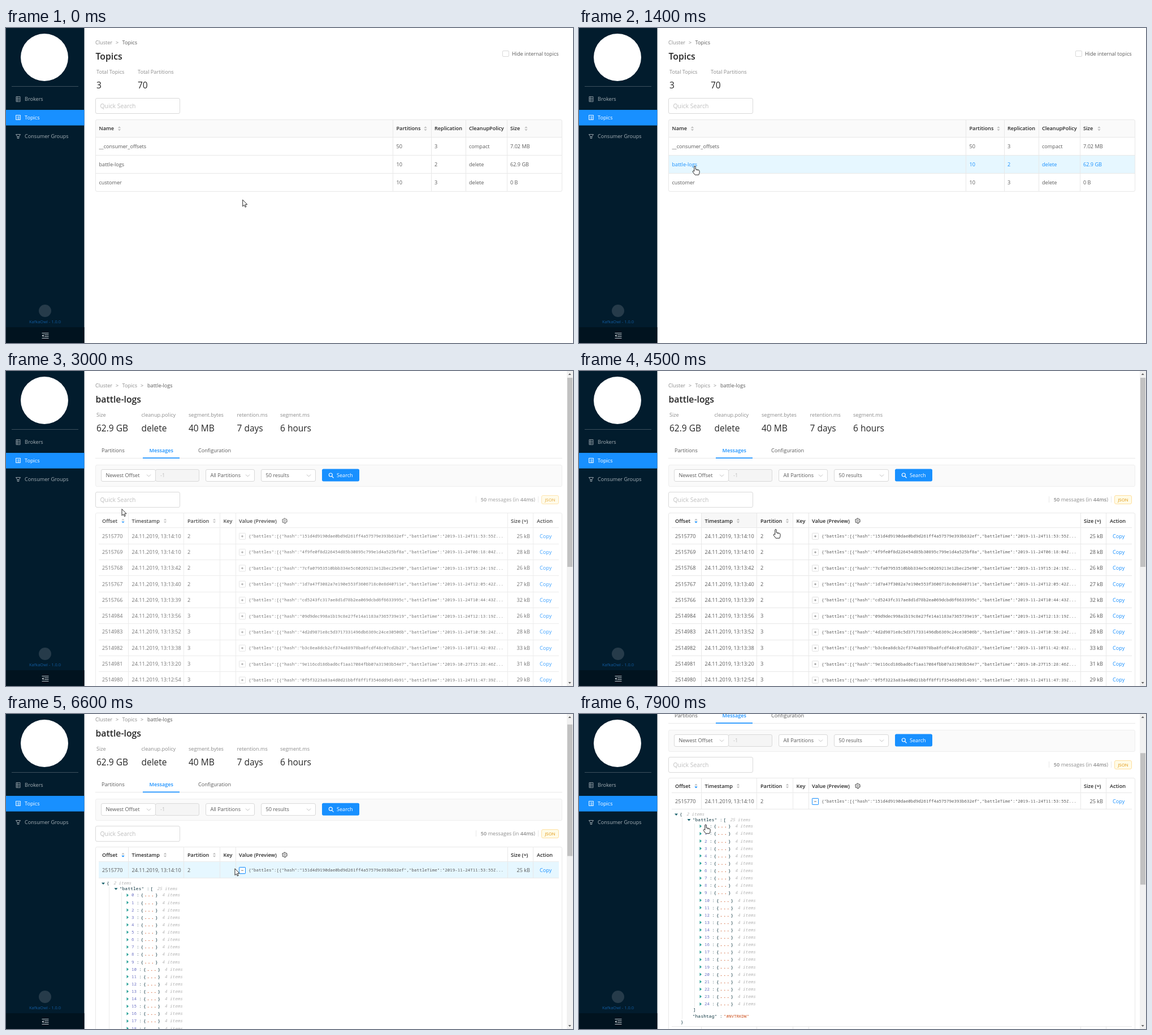
Recreate the animation shown at these times as an HTML page. Size 1003 px wide and 558 px high, loop 8000 ms.

```html
<!DOCTYPE html>
<html lang="en">
<head>
<meta charset="utf-8">
<title>Topic browser</title>
<style>
  html, body { margin: 0; width: 100%; height: 100%; overflow: hidden; background: #fff; }
  svg { display: block; width: 1003px; height: 558px; }
  text { font: 9.12px "Open Sans", sans-serif; fill: #595959; white-space: pre; }
  .dim { fill: #8c8c8c; }
  .bold { font-weight: 600; fill: #262626; }
  .title { font-size: 15.8px; font-weight: 600; fill: #262626; }
  .stat { font-size: 15.5px; fill: #262626; }
  .hint { font-size: 10.4px; fill: #bfbfbf; }
  .pale { fill: #bfbfbf; }
  .blue { fill: #1890ff; }
  .active { fill: #1890ff; font-weight: 600; }
  .white { fill: #fff; }
  .menu { fill: #a6b0b6; }
  .version { font-size: 7.5px; fill: #125a9e; text-anchor: middle; }
  .tag { font-size: 7.9px; fill: #e0940c; }
  .end { text-anchor: end; }
  .mid { text-anchor: middle; }
  .big { font-size: 11.6px; text-anchor: middle; }
  .mono, .key, .dots, .count, .index, .string { font: 7.53px "Noto Sans Mono", monospace; }
  .key { fill: #002b36; letter-spacing: .3px; }
  .dots { fill: #cb4b16; font-weight: 700; letter-spacing: 1.6px; }
  .count { fill: #b3b3b3; font-style: italic; }
  .index { fill: #6c71c4; }
  .string { fill: #cb4b16; }
</style>
</head>
<body>
<svg id="stage" viewBox="0 0 1003 558"></svg>
<script>
const LOOP = 8000, BLUE = '#1890ff', BORDER = '#e8e8e8', HOVER = '#e6f7ff';

// --- markup helpers ---
const text = (x, y, s, cls = '') => `<text x="${x}" y="${y}" class="${cls}">${s}</text>`;
const rect = (x, y, w, h, fill, extra = '') =>
  `<rect x="${x}" y="${y}" width="${w}" height="${h}" fill="${fill}" ${extra}/>`;
const box = (x, y, w, h, fill = '#fff', stroke = '#d9d9d9', r = 2.5) =>
  rect(x + .5, y + .5, w - 1, h - 1, fill, `stroke="${stroke}" rx="${r}"`);
const path = (d, fill, extra = '') => `<path d="${d}" fill="${fill}" ${extra}/>`;
const stroke = (d, color, width = 1) => path(d, 'none', `stroke="${color}" stroke-width="${width}"`);
const hLine = (x, y, w, color = BORDER) => rect(x, y, w, 1, color);
const vLine = (x, y, h, color = BORDER) => rect(x, y, 1, h, color);
const group = (id, body, extra = '') => `<g id="${id}" ${extra}>${body}</g>`;
const each = (list, fn) => list.map(fn).join('');
const range = n => [...Array(n).keys()];

const sorter = (x, y, down = '#bfbfbf') =>
  path(`M${x - 2.7} ${y - 1}h5.4l-2.7 -3z`, '#bfbfbf') + path(`M${x - 2.7} ${y + 1}h5.4l-2.7 3z`, down);
const gear = (x, y) => `<circle cx="${x}" cy="${y}" r="4.3" fill="none" stroke="#595959" stroke-width="1.2" stroke-dasharray="3.2 1.3"/>`
  + `<circle cx="${x}" cy="${y}" r="3.6" fill="#fff" stroke="#595959" stroke-width=".8"/>`
  + `<circle cx="${x}" cy="${y}" r="1.4" fill="none" stroke="#595959" stroke-width=".8"/>`;
const select = (x, w, label) => box(x, 174, w, 22) + text(x + 8.5, 188.3, label)
  + stroke(`M${x + w - 16} 183.5l3.5 3.5l3.5 -3.5`, '#bfbfbf');
const quickSearch = y => box(158, y, 150, 28) + text(166.5, y + 18, 'Quick Search', 'hint');
const stats = list => each(list, ([x, label, value]) => text(x, 81.3, label, 'dim') + text(x, 107, value, 'stat'));

// --- sidebar ---
const sidebar = rect(0, 0, 138.5, 558, '#021c2d') + rect(0, 530, 138.5, 28, '#01131f')
  + '<circle cx="68" cy="52" r="42" fill="#fff"/><circle cx="69" cy="501" r="11" fill="#263b4a"/>'
  + hLine(10, 103, 118, '#3c505d') + rect(0, 145, 138.5, 27.6, BLUE)
  + stroke('M18 121.5h7v9h-7zM18 124.5h7M18 127.5h7M19.5 123h2M19.5 126h2M19.5 129h2', '#a6b0b6', .8)
  + stroke('M17.5 154.5h8v8h-8zM19 157h1M21 157h3M19 159h1M21 159h3M19 161h1M21 161h3', '#fff', .9)
  + stroke('M17.5 188.5h8l-2.7 4v3h-2.6v-3zM20 192.5h3', '#a6b0b6', .9)
  + text(33, 129.3, 'Brokers', 'menu') + text(33, 162.3, 'Topics', 'white')
  + text(33, 195.3, 'Consumer Groups', 'menu') + text(69, 523.3, 'KafkaOwl - 1.0.0', 'version')
  + stroke('M63.5 540.5h12M68 543.5h7.5M68 546.5h7.5M63.5 549.5h12', '#c4c9ce') + path('M66.5 542.5v5l-3 -2.5z', '#c4c9ce');

// --- topic list ---
const topics = [
  ['__consumer_offsets', 50, 3, 'compact', '7.02 MB'],
  ['battle-logs', 10, 2, 'delete', '62.9 GB'],
  ['customer', 10, 3, 'delete', '0 B'],
];
const topicX = [164.5, 690.5, 758, 819, 892];
const topicCells = (row, cls) => each(topics[row], (s, i) => text(topicX[i], 213.3 + row * 31.8, s, cls));
const topicHover = (id, row) => group(id, rect(159, 194 + row * 31.8, 824, 31.5, HOVER) + topicCells(row, 'blue'));
const topicPage = text(158, 29.3, 'Cluster', 'dim') + text(194, 29.3, '&gt;', 'dim') + text(205.5, 29.3, 'Topics')
  + text(158.5, 55.8, 'Topics', 'title') + box(878, 40, 12, 11, '#fff', '#d9d9d9', 1.5)
  + text(895, 49.3, 'Hide internal topics')
  + stats([[160, 'Total Topics', 3], [233, 'Total Partitions', 70]]) + quickSearch(124)
  + rect(158, 162, 826, 32, '#fafafa', 'rx="3"')
  + each(range(3), i => topicCells(i))
  + topicHover('hoverBattle', 1) + topicHover('hoverCustomer', 2)
  + box(158, 162, 826, 128, 'none', BORDER)
  + each([193, 225, 257], y => hLine(158, y, 826)) + each([684, 752, 813, 886], x => vLine(x, 162, 128))
  + each(['Name', 'Partitions', 'Replication', 'CleanupPolicy', 'Size'], (s, i) => text(topicX[i], 181.4, s, 'bold'))
  + each([200.5, 742, 920], x => sorter(x, 178.3));

// --- topic details ---
const details = text(158, 29.3, 'Cluster', 'dim') + text(194, 29.3, '&gt;', 'dim') + text(205.5, 29.3, 'Topics', 'dim')
  + text(238, 29.3, '&gt;', 'dim') + text(250, 29.3, 'battle-logs') + text(158.5, 55.8, 'battle-logs', 'title')
  + stats([[160, 'Size', '62.9 GB'], [239.5, 'cleanup.policy', 'delete'], [323, 'segment.bytes', '40 MB'],
           [408.5, 'retention.ms', '7 days'], [485, 'segment.ms', '6 hours']])
  + text(169, 143.8, 'Partitions') + text(253.5, 143.8, 'Messages', 'active') + text(340, 143.8, 'Configuration')
  + hLine(158, 154, 826) + rect(242, 153.3, 65, 1.7, BLUE)
  + box(158, 166, 826, 39, '#fafafa', '#eeeeee') + box(264, 174, 78, 22, '#f5f5f5') + select(168, 97, 'Newest Offset')
  + text(273, 188.3, '-1', 'pale') + select(353, 87, 'All Partitions') + select(451, 97, '50 results')
  + group('button', rect(559, 173.5, 66, 22, BLUE, 'rx="2.7"') + text(585, 188.3, 'Search', 'white'))
  + group('lens', stroke('M576.5 186.5l3 3M577.3 184a3 3 0 1 1 -6 0a3 3 0 1 1 6 0', '#fff', 1.1))
  + group('spinner', stroke('M3 0A3 3 0 0 1 0 3', '#fff'))
  + quickSearch(214);

const header = (labels, lines, sorters, gearX) => each(lines, x => vLine(x, 252, 26))
  + each(labels, ([x, s]) => text(x, 268.8, s, 'bold'))
  + each(sorters, (x, i) => sorter(x, 265.5, i ? '#bfbfbf' : BLUE)) + gear(gearX, 265.3);

const emptyTable = box(158, 251, 826, 157, '#fff', BORDER) + hLine(164, 277, 814)
  + header([[170, 'Offset'], [222.5, 'Timestamp'], [297, 'Partition'], [361, 'Key'], [388.5, 'Value (Preview)'],
            [897.5, 'Size (≈)'], [942.5, 'Action']], [216, 291, 355, 382, 891, 936], [207, 281.5, 345], 469.5)
  + path('M546 333l7 -7h36l7 7v21q0 2 -2 2h-46q-2 0 -2 -2z', '#cfd4da')
  + rect(555, 304, 31, 36, '#f0f2f4') + rect(559, 308, 24, 14, '#d7dbe0')
  + path('M546 333h13q2 7 5 7h14q3 0 5 -7h13v21q0 2 -2 2h-46q-2 0 -2 -2z', '#dce0e6')
  + each([[567, 323], [574, 325], [565, 330], [572, 332]], ([x, y]) => rect(x, y, 4, 4, '#1070d8', 'rx="1"'))
  + '<ellipse cx="602" cy="298" rx="10.5" ry="8" fill="#d9dde3"/>' + path('M593 300l-1 7l8 -2z', '#d9dde3')
  + each([598, 602, 606], x => `<circle cx="${x}" cy="298" r="1.2" fill="#fff"/>`)
  + text(571, 376, 'No messages', 'big') + text(571, 391.3, 'Either the selected topic/partition did not contain any messages', 'mid pale');

const messages = [
  [2515770, '13:14:10', 2, '151d4d9190dae0bd9d261ff4a57579e393b632ef', '11-24T11:53:55', 25],
  [2515769, '13:14:10', 2, '4f9fe0f8d226454d85b30895c799e1d4a525bf8a', '11-24T06:18:04', 28],
  [2515768, '13:13:42', 2, '7cfa07953510bbb334e5c60269213e12bec25e90', '11-19T15:24:19', 26],
  [2515767, '13:13:40', 2, '1d7a47f3082a7e190e553f3606718c0e8d40711e', '11-24T12:05:42', 27],
  [2515766, '13:13:39', 2, 'cd5243fc317ae8d1d78b2ea069dcbd6f6633995c', '11-24T10:44:43', 32],
  [2514984, '13:13:56', 3, '09d9dec998a1b19c8e27fe14a1183a7365739e19', '11-24T12:13:19', 26],
  [2514983, '13:13:52', 3, '4d2d9871e8c5d3717331496db6369c24ce30506b', '11-24T10:58:24', 28],
  [2514982, '13:13:38', 3, 'b3c8ea8dcb2cf374a88978ba8fcdf48c07cd2b23', '11-10T11:42:03', 33],
  [2514981, '13:13:20', 3, '9e116cd186bad6cf1aa17084fbb07a31903b54e7', '10-27T15:28:46', 31],
  [2514980, '13:12:54', 3, '0f5f3223a83a4d0d21bbff8ff1f3546dd9d14b91', '11-24T11:47:39', 29],
];
const columns = [216, 314, 378, 406, 887, 932];
const messageRow = ([offset, time, partition, hash, battle, size], i) => {
  const y = 292.3 + i * 28.3, base = y + 3.3;
  return text(170, base, offset) + text(222.5, base, `24.11.2019, ${time}`) + text(321, base, partition)
    + box(412, y - 5.5, 12, 12, '#fff', '#e0e0e0', 1) + stroke(`M416 ${y + .5}h4M418 ${y - 1.5}v4`, '#777', .8)
    + text(429, y + 2.8, `{"battles":[{"hash":"${hash}","battleTime":"2019-${battle}Z...`, 'mono')
    + text(927, base, `${size} kB`, 'end') + text(944, base, 'Copy', 'blue')
    + hLine(164, Math.round(y + 13.5), 814) + each(columns, x => vLine(x, y - 14, 28.3));
};

const treeItem = i => {
  const y = 339.3 + i * 13.12, dx = i > 9 ? 4.6 : 0;
  return path(`M213.5 ${y - 5.5}v6l3.5 -3z`, '#2aa198') + text(222, y, i, 'index') + text(231 + dx, y, ':', 'key')
    + text(238.5 + dx, y, '{', 'key') + text(244.7 + dx, y, '...', 'dots') + text(264 + dx, y, '}', 'key')
    + text(276 + dx, y, '4 items', 'count');
};
const tree = vLine(182, 322, 356, '#ebebeb') + vLine(204, 332, 325, '#ebebeb')
  + path('M169 314.5h6l-3 3.5z', '#17606b') + text(178, 318.3, '{', 'key') + text(190, 318.3, '2 items', 'count')
  + path('M191.5 324h6l-3 3.5z', '#17606b') + text(201, 327.8, '"battles"', 'key') + text(249, 327.8, ':', 'key')
  + text(255.5, 327.8, '[', 'key') + text(267, 327.8, '25 items', 'count') + each(range(25), treeItem)
  + text(202, 663.5, ']', 'key') + text(201, 675.5, '"hashtag"', 'key') + text(249, 675.5, ':', 'key')
  + text(256, 675.5, '"#NVTRKDW"', 'string') + text(180, 685.5, '}', 'key') + hLine(164, 691, 814);

const messageTable = vLine(831, 222, 11) + vLine(941, 222, 11)
  + text(936, 231.3, '<tspan font-weight="600">50</tspan> messages (in <tspan font-weight="600">44ms</tspan>)', 'dim end')
  + box(947, 220, 31, 16, '#fffbe6', '#ffe0a0') + text(962.5, 230.8, 'JSON', 'tag mid')
  + box(158, 251, 826, 1600, '#fff', BORDER)
  + group('hoverTime', rect(217, 252, 97, 25, '#f2f2f2')) + group('hoverPartition', rect(315, 252, 63, 25, '#f2f2f2'))
  + header([[170, 'Offset'], [222.5, 'Timestamp'], [321, 'Partition'], [384.5, 'Key'], [412, 'Value (Preview)'],
            [893, 'Size (≈)'], [939, 'Action']], columns, [207, 281.5, 368.5], 493)
  + hLine(164, 277, 814) + group('hoverRow', rect(164, 278, 814, 28, HOVER))
  + messageRow(messages[0], 0)
  + group('buttonFocus', box(412, 287, 12, 12, 'none', BLUE, 1))
  + group('minus', box(412, 287, 12, 12, '#fff', BLUE, 1) + stroke('M416 293h4', '#555', .8))
  + group('tree', tree) + group('rows', each(messages.slice(1), (m, i) => messageRow(m, i + 1)));

const scrollbar = rect(992, 0, 11, 558, '#f1f1f1') + rect(993, 12, 9, 335, '#c1c1c1', 'id="thumb"')
  + path('M994.7 7h5l-2.5 -3z', '#606060') + path('M994.7 551h5l-2.5 3z', '#606060');

const cursors = group('arrow', path('M0 0V11.6L2.7 9.2L4.4 13.1L6.2 12.3L4.5 8.5L8 8.3Z', '#fff', 'stroke="#111" stroke-width=".9"'))
  + group('hand', path('M-1.2 9.5V1.2a1.2 1.2 0 0 1 2.4 0V5.6l5.2 1.2q1.7 .5 1.7 2.2v3l-1.3 3.7H.2L-3.6 10.6Q-4.2 9 -3 8.4Q-2 8.2 -1.2 9.5Z',
      '#fff', 'stroke="#111" stroke-width=".9"') + stroke('M3.2 6.3v2M5.4 6.8v1.8', '#111', .6));

const stage = document.getElementById('stage');
stage.innerHTML = group('topicPage', topicPage)
  + group('detailPage', details + group('emptyTable', emptyTable) + group('messageTable', messageTable))
  + group('scrollbar', scrollbar) + group('sidebar', sidebar) + cursors;
const parts = Object.fromEntries([...stage.querySelectorAll('[id]')].map(e => [e.id, e]));

// --- motion ---
const ramp = (t, from, to) => Math.min(1, Math.max(0, (t - from) / (to - from)));
const smooth = p => p * p * (3 - 2 * p);
const hover = (t, from, to) => ramp(t, from, from + 300) - ramp(t, to, to + 300);
const within = (t, ...spans) => spans.some(([a, b]) => t >= a && t < b);
const fade = (id, value) => parts[id].setAttribute('opacity', value);
const show = (id, on) => parts[id].setAttribute('display', on ? 'inline' : 'none');
const move = (id, x, y, more = '') => parts[id].setAttribute('transform', `translate(${x} ${y}) ${more}`);

// Pointer moves: start, end, destination
const moves = [
  [500, 1300, 205, 244.5], [3850, 3900, 208, 245], [4100, 4900, 413, 297], [5000, 5400, 417, 294.5],
  [5950, 6200, 407, 280], [6400, 6600, 405, 274], [6600, 7200, 379, 237], [7300, 7900, 224, 196],
];
function pointer(t) {
  let x = 418.7, y = 304.3;
  for (const [from, to, nx, ny] of moves) {
    const p = 1 - (1 - ramp(t, from, to)) ** 1.65;
    x += (nx - x) * p;
    y += (ny - y) * p;
  }
  return [x, y];
}

function draw() {
  const t = performance.now() % LOOP;
  const expanded = t >= 5700, loaded = t >= 2600;
  const scroll = 69 * (smooth(ramp(t, 6500, 6825)) + smooth(ramp(t, 6800, 7125)));

  show('topicPage', t < 2100);
  show('detailPage', t >= 2100);
  fade('hoverCustomer', hover(t, 630, 1060));
  fade('hoverBattle', ramp(t, 1080, 1380));

  fade('detailPage', ramp(t, 2050, 2250));
  move('detailPage', 0, -scroll);
  fade('button', loaded ? 1 : .65);
  show('lens', loaded);
  show('spinner', !loaded);
  move('spinner', 576.5, 185.5, `rotate(${t * .36 - 828})`);
  show('emptyTable', !loaded);
  fade('emptyTable', .33);
  show('messageTable', loaded);
  fade('messageTable', ramp(t, 2550, 3100));

  fade('hoverTime', hover(t, 4150, 4390));
  fade('hoverPartition', hover(t, 4400, 4530));
  fade('hoverRow', hover(t, 4540, 6680));
  fade('buttonFocus', ramp(t, 5000, 5300));
  show('minus', expanded);
  show('tree', expanded);
  move('rows', 0, expanded ? 385.5 : 0);

  show('scrollbar', loaded);
  parts.thumb.setAttribute('y', 12 + scroll * .415);
  parts.thumb.setAttribute('height', expanded ? 233 : 335);

  const [x, y] = pointer(t);
  const pointing = within(t, [630, 2100], [4170, 4560], [5000, 6000], [7600, LOOP]);
  show('hand', pointing);
  show('arrow', !pointing);
  move('hand', x, y);
  move('arrow', x, y);
  requestAnimationFrame(draw);
}
draw();
</script>
</body>
</html>
```
